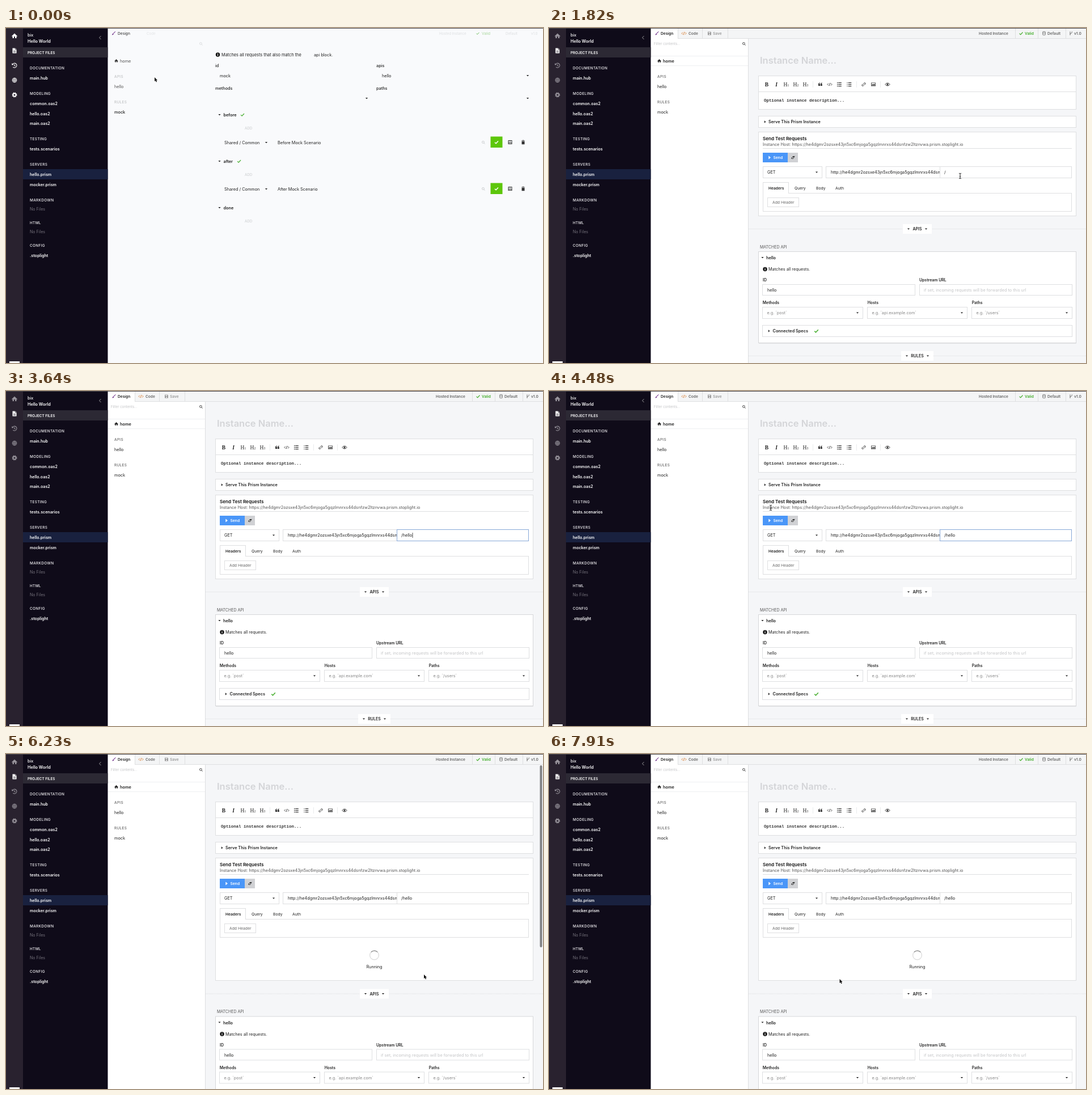
These frames come from a looping animation (947x591 px, 8000 ms). An HTML page with a canvas:

```html
<!DOCTYPE html>
<html lang="en">
<head>
<meta charset="utf-8">
<title>API console</title>
<style>
html, body { margin: 0; width: 100%; height: 100%; overflow: hidden; background: #f5f6f8; }
canvas { display: block; }
</style>
</head>
<body>
<canvas id="stage" width="947" height="591"></canvas>
<script>
const g = document.getElementById('stage').getContext('2d');
const LOOP = 8000, OPEN = 1260, FOCUS = 2100, TYPE = 2940, RUN = 5390;
const SANS = 'Inter, "Open Sans", sans-serif';
const INK = '#222', LINE = '#dedfe1', GREEN = '#43ad2b';
const HOST = 'he4dgmr2ozsxe43jn5xc6mjoga5gqzlmnrxs44dsnfzw2ltznvwa.prism.stoplight.io';

// y is the middle of the capitals
function text(s, x, y, { size = 7.3, w = 400, c = INK, ls = 0, font = SANS, align = 'left' } = {}) {
  g.font = `${w} ${size}px ${font}`;
  g.letterSpacing = ls + 'px';
  g.textAlign = align;
  g.fillStyle = c;
  g.fillText(s, x, y + size * 0.36);
}
const bold = (s, x, y, o) => text(s, x, y, { w: 600, ...o });
const caps = (s, x, y, c, w = 500) => text(s, x, y, { size: 6.4, w, ls: 0.35, c });

function fill(x, y, w, h, c) { g.fillStyle = c; g.fillRect(x, y, w, h); }

function box(x1, y1, x2, y2, bg = '#fff', line = LINE) {
  fill(x1, y1, x2 - x1, y2 - y1, bg);
  g.strokeStyle = line;
  g.lineWidth = 1;
  g.strokeRect(x1 + 0.5, y1 + 0.5, x2 - x1 - 1, y2 - y1 - 1);
}

function icon(d, x, y, c, stroke = 0, k = 1) {
  g.save();
  g.translate(x, y);
  g.scale(k, k);
  g.fillStyle = g.strokeStyle = c;
  g.lineWidth = stroke;
  const p = new Path2D(d);
  if (stroke) g.stroke(p); else g.fill(p, 'evenodd');
  g.restore();
}

const ring = r => `M${r} 0A${r} ${r} 0 1 1 ${-r} 0A${r} ${r} 0 1 1 ${r} 0Z`;
const HOME = 'M-5 .3L0-4.5L5 .3L4.3 1L3.5 .4V4H1V1H-1V4H-3.5V.4L-4.3 1Z';
const FILE = 'M-3.5-4.5H.8V-1.7H3.5V4.5H-3.5ZM1.5-4.5L3.5-2.4H1.5ZM-2 0V.8H2V0ZM-2 2V2.8H2V2Z';
const down = (x, y, c = INK) => icon('M-2.1-1H2.1L0 1.2Z', x, y, c);
const right = (x, y, c = INK, k = 1) => icon('M-1.2-2.2L1.4 0L-1.2 2.2Z', x, y, c, 0, k);
const check = (x, y, c = GREEN, k = 1, w = 1.15) => icon('M-3 .2L-.9 2.2L3-2', x, y, c, w, k);
const lens = (x, y, c) => icon(ring(1.9) + 'M1.4 1.4L3.2 3.2', x - 0.6, y - 0.6, c, 1);
const code = (x, y, c) => icon('M-2-2L-4 0L-2 2M2-2L4 0L2 2M.8-2.6L-.8 2.6', x, y, c, 0.9);
const brush = (x, y) => icon('M3.3-3.3L0 .2L-.8-.6L2.5-3.5ZM-1.2 0C.4.7 0 2.8-3.3 2.8C-2.2 1.8-2.6.4-1.2 0Z', x, y, '#6b2a86');

function info(x, y) {
  icon(ring(3.7), x, y, '#111');
  fill(x - 0.6, y - 0.6, 1.2, 2.8, '#fff');
  fill(x - 0.6, y - 2.3, 1.2, 1.1, '#fff');
}

function sidebar(open) {
  fill(0, 0, 30, 591, '#29222f');
  fill(30, 0, 149.5, 591, '#0f0b19');
  fill(30, 34, 149.5, 18, '#2c2934');
  fill(30, 249, 149.5, 18, '#19213f');
  const dim = open ? '#96929a' : '#fff';
  icon(HOME, 15, 14, dim);
  icon(FILE, 15, 40, '#fff');
  icon('M-3.4-1.8A3.9 3.9 0 1 1-2.7 2.8M-4.2-3.6V-1.2H-1.8M0-2V.3L1.7 1.4', 15, 66, dim, 1.1);
  icon(ring(3.9) + 'M-4 0H4M0-4V4M0-4C-2.5-2-2.5 2 0 4C2.5 2 2.5-2 0-4', 15, 92, dim, 0.9);
  g.setLineDash([1.6, 1.4]);
  icon(ring(3.8), 15, 118, dim, 1.4);
  g.setLineDash([]);
  icon(ring(2.5), 15, 118, dim, 1.8);
  fill(6, 588, 18, 3, '#fff');

  text('bix', 38, 12, { c: '#fff', w: 500 });
  bold('Hello World', 38, 23.5, { c: '#fff' });
  icon('M1.5-3L-1.5 0L1.5 3', 166, 17, '#aaa', 0.9);
  bold('PROJECT FILES', 38, 43.5, { c: '#fff', size: 6.4 });
  const heads = { DOCUMENTATION: 71, MODELING: 115.5, TESTING: 196, SERVERS: 241, MARKDOWN: 303.5, HTML: 343.5, CONFIG: 383.5 };
  for (const h in heads) caps(h, 42, heads[h], '#f4f3f6', 550);
  const files = { 'main.hub': 88, 'common.oas2': 133, 'hello.oas2': 151, 'main.oas2': 168.5, 'tests.scenarios': 213.5,
    'hello.prism': 258.5, 'mocker.prism': 276, '.stoplight': 401 };
  for (const f in files) bold(f, 42, files[f], { c: '#fff', size: 7.1 });
  for (const y of [319.5, 359.5]) text('No Files', 42, y, { c: '#75727c', size: 7.1 });
}

function rulePage(hover) {
  const faint = '#c9cbcd';
  fill(179, 0, 768, 591, '#f9fafc');
  brush(190, 9.5);
  text('Design', 197, 9.5, { size: 6.6, w: 500, c: '#444' });
  text('Code', 248, 9.5, { size: 6.2, c: '#e2e3e5' });
  text('Hosted Instance', 764, 9.5, { size: 6.2, c: '#dcdee0' });
  check(832, 9.5, '#62b74e', 0.8);
  text('Valid', 839, 9.5, { size: 6.6, c: '#a8d69c' });
  text('Default', 881, 9.5, { size: 6.2, c: '#dcdee0' });
  text('v1.0', 926, 9.5, { size: 6.2, c: '#dcdee0' });
  lens(344, 28, '#dcdee0');

  icon(HOME, 194.5, 58, hover ? '#4a90c8' : '#333', 0, 0.64);
  text('home', 201, 58, { c: hover ? '#c2cad1' : '#555' });
  caps('APIS', 191, 86, '#bfc1c3');
  text('hello', 191, 103, { c: '#555' });
  caps('RULES', 191, 131, '#bfc1c3');
  text('mock', 191, 148, { w: 500 });

  info(373.5, 47);
  text('Matches all requests that also match the', 380, 47, { size: 7.4 });
  text('api block.', 543, 47);
  text('id', 369, 66.5, { w: 500 });
  text('apis', 653, 66.5, { w: 500 });
  text('mock', 377, 84);
  text('hello', 663, 84);
  text('methods', 369, 106.5, { w: 500 });
  text('paths', 653, 106.5, { w: 500 });
  down(920, 84);
  down(636, 124);
  down(920, 124);

  for (const [name, y, tick] of [['before', 153, 417], ['after', 235, 411], ['done', 317, 0]]) {
    down(376.5, y);
    bold(name, 383.5, y);
    if (tick) check(tick, y);
    text('ADD', 421, y + 23.5, { size: 6.2, c: faint });
    if (!tick) continue;
    const r = y + 49;
    text('Shared / Common', 385, r);
    down(459, r);
    text(name[0].toUpperCase() + name.slice(1) + ' Mock Scenario', 479, r);
    lens(842, r, faint);
    fill(854.5, r - 10.5, 21, 19.5, '#5dc60b');
    check(865, r - 0.5, '#fff', 1, 1.5);
    icon('M-3-3.5H3.5V3.5H-3.5V-3ZM-2.4-2.6V.6H2.6V-2.6ZM-2.5 1.6V2.5H2.5V1.6ZM-1.5-1.8H1.7V-1.1H-1.5Z', 889, r - 0.5, '#333');
    icon('M-3-3H-1V-3.8H1V-3H3V-2.2H-3ZM-2.5-1.6H2.5V3.8H-2.5Z', 912, r - 0.5, '#333');
  }
}

function header() {
  fill(179, 0, 768, 18, '#f4f5f6');
  fill(179, 18, 768, 1, LINE);
  fill(179, 1, 48, 18, '#fff');
  for (const x of [227, 270, 315, 822, 862, 911]) fill(x, 1, 1, 17, LINE);
  const o = { size: 6.6, c: '#666' };
  brush(190.5, 9.5);
  bold('Design', 197, 9.5, { size: 6.6 });
  code(238, 9.5, '#d87a2c');
  bold('Code', 246, 9.5, o);
  icon('M-3-3H2L3-2V3H-3ZM-1.7-2.2V-.7H1.3V-2.2ZM-1 .7V2.2H1V.7Z', 283, 9.5, '#999');
  bold('Save', 289, 9.5, { ...o, c: '#999' });
  bold('Hosted Instance', 758, 9.5, o);
  check(832.5, 9.5);
  bold('Valid', 839, 9.5, { size: 6.6, c: GREEN });
  icon('M-2.5-2.4C-2.5-3.5 2.5-3.5 2.5-2.4V2.4C2.5 3.5-2.5 3.5-2.5 2.4ZM-2.5-2.4C-2.5-1.3 2.5-1.3 2.5-2.4M-2.5 0C-2.5 1.1 2.5 1.1 2.5 0', 873, 9.5, '#777', 0.8);
  bold('Default', 879, 9.5, o);
  icon('M-1.5-2V2M1.8-2C1.8 0-1.5 0-1.5 1.5M-1.5-3.2V-2M1.8-3.2V-2M-1.5 2V3.2', 920.5, 9.5, '#666', 1);
  bold('v1.0', 926, 9.5, o);
}

function contents() {
  fill(179, 19, 172, 572, '#fff');
  fill(351, 19, 1, 572, LINE);
  text('Filter contents...', 185, 27.5, { size: 6.1, c: '#c3c4c6' });
  lens(344, 28, '#444');
  fill(180, 49, 171, 1, '#eeeff1');
  fill(180, 66, 171, 1, '#eeeff1');
  icon(HOME, 194.5, 58, '#222', 0, 0.68);
  bold('home', 201, 58);
  caps('APIS', 191, 86, '#666');
  text('hello', 191, 103);
  caps('RULES', 191, 131, '#666');
  text('mock', 191, 148);
}

function toolbar() {
  const y = 99.5, serif = '"Liberation Serif", serif', c = '#333';
  text('B', 384, y, { size: 9.5, w: 700, font: serif, align: 'center' });
  text('I', 401, y, { size: 9.5, w: 'italic 700', font: serif, align: 'center' });
  [414, 431, 448].forEach((x, i) => {
    text('H', x - 0.5, y, { size: 9.5, font: serif });
    text(i + 1, x + 6.5, y + 2, { size: 5.5, font: serif });
  });
  for (const x of [475, 478.8]) icon('M0 0C0-2 1-3 3-3V-2.2C2-2 1.8-1.2 1.8-.4H3V2.6H0Z', x, y, c);
  code(495, y, c);
  for (const x of [512, 529.5]) for (const d of [-3, 0, 3]) {
    fill(x - 1.8, y + d - 0.6, 5.6, 1.2, c);
    fill(x - 4, y + d - 0.7, x > 520 ? 0.9 : 1.4, 1.4, c);
  }
  icon('M-.6.6L.8-.8M-.6-1.2L.8-2.6C2.2-3.6 3.8-2 2.8-.6L1.6.6M.6 1.2L-.8 2.6C-2.2 3.6-3.8 2-2.8.6L-1.6-.6', 555, y, c, 1);
  icon('M-4-3H4V3H-4ZM-3.2-2.2V2.2H3.2V-2.2ZM-2.8 1.8V.8L-1.3-.6L0 .6L1.4-1L2.8 .6V1.8Z', 572, y, c);
  icon('M-4 0C-2-3.2 2-3.2 4 0C2 3.2-2 3.2-4 0Z', 597, y, c, 1);
  icon(ring(1.5), 597, y, c);
  for (const x of [465, 542, 584]) fill(x, 94, 1, 11, '#eaebec');
}

function chip(s, y, half) {
  g.strokeStyle = '#dcdee0';
  g.lineWidth = 1;
  g.setLineDash([1, 1]);
  g.beginPath();
  g.moveTo(352, y);
  g.lineTo(947, y);
  g.stroke();
  g.setLineDash([]);
  fill(649.5 - half, y - 8.5, half * 2, 17, '#fff');
  bold(s, 649.5, y, { size: 7, align: 'center' });
  down(659.5 - half, y);
  down(639.5 + half, y);
}

function apiBox(dy) {
  g.save();
  g.translate(0, dy);
  chip('APIS', 354.5, 25.5);
  text('MATCHED API', 372, 386, { size: 7, c: '#555' });
  fill(370, 555, 560, 2, '#e4e5e7');
  box(369, 394, 930, 556, '#fff', '#d6d7d9');
  down(376.5, 405);
  bold('hello', 383, 405.5);
  info(381, 425.5);
  text('Matches all requests.', 387, 425.5);
  bold('ID', 377, 445, { size: 6.9 });
  bold('Upstream URL', 653, 445, { size: 6.9 });
  box(376, 452, 646, 472);
  box(653, 452, 923, 472);
  text('hello', 385, 462.5);
  text('if set, incoming requests will be forwarded to this url', 661, 462.5, { c: '#c4c5c7' });
  for (const [label, hint, x, end] of [['Methods', 'post', 376, 554], ['Hosts', 'api.example.com', 561, 738], ['Paths', '/users', 745, 923]]) {
    bold(label, x + 0.7, 485, { size: 6.9 });
    box(x, 492, end, 513);
    text('e.g. `' + hint + '`', x + 8.5, 502.5, { c: '#888' });
    down(end - 10, 502.5);
  }
  box(376, 524, 923, 545);
  right(388, 534.5);
  bold('Connected Specs', 394.5, 534.5);
  check(471.5, 534.5, GREEN, 1.1, 1.4);
  chip('RULES', 578.5, 28.5);
  g.restore();
}

function spinner(t) {
  const a = -Math.PI / 2 + (t - RUN) / 840 * Math.PI * 2;
  g.lineWidth = 1.3;
  g.strokeStyle = '#dcdcdc';
  g.beginPath();
  g.arc(649.5, 355, 7.9, 0, 7);
  g.stroke();
  g.strokeStyle = '#8a8a8a';
  g.beginPath();
  g.arc(649.5, 355, 7.9, a - 0.8, a + 0.8);
  g.stroke();
  text('Running', 649.5, 375.5, { align: 'center' });
}

// The caret restarts its blink on focus and on each key
function pathField(t) {
  const keys = [TYPE, 3220, 3360, 3500, 3640].filter(k => t >= k);
  const value = '/' + 'hello'.slice(0, keys.length);
  const focused = t >= FOCUS && t < RUN;
  const blur = Math.min(1, Math.max(0, (t - RUN) / 300));
  const grey = Math.round(190 + 32 * blur);
  box(689, 244, 922, 265, '#fff', focused ? '#88a9d8' : t < FOCUS ? LINE : `rgb(${grey},${grey},${grey})`);
  text(value, 697, 254.5);
  const since = t - (keys.length ? keys[keys.length - 1] : FOCUS);
  if (focused && since % 1000 < 500) fill(697.5 + g.measureText(value).width, 250, 0.8, 9, '#222');
}

function homePage(t) {
  const run = t >= RUN;
  fill(179, 0, 768, 591, '#f5f6f8');
  header();
  contents();
  bold('Instance Name...', 372, 57, { size: 16.5, c: '#d4d5d8' });
  box(369, 84, 930, 144);
  fill(370, 112, 559, 1, LINE);
  toolbar();
  text('Optional instance description...', 379, 127.5, { size: 7.42, w: 700, c: '#333', font: '"Liberation Mono", monospace' });
  box(369, 155, 930, 176);
  right(381, 165.5);
  bold('Serve This Prism Instance', 387, 165.5);

  box(369, 183, 930, run ? 400 : 332);
  bold('Send Test Requests', 377, 195, { size: 8.1, c: '#111' });
  text('Instance Host: https://' + HOST, 377, 205, { c: '#555' });
  fill(377, 212, 545, 1, LINE);
  const hover = t >= 4760 && t < 5600;
  fill(377, 220, 44, 17, hover ? '#62a6fb' : '#4a96f8');
  right(389, 228.5, '#fff', 1.4);
  bold('Send', 395.5, 228.5, { size: 6.7, c: '#fff' });
  fill(421, 220, 18, 17, '#d0d1d4');
  icon('M-3.4 1L0-2.6H3.2L.2 2.6H-2.6ZM-2.2 1L-1.7 1.7H-.1L1-.4H-.8Z', 430.5, 228.5, '#333');

  box(377, 244, 482, 265);
  text('GET', 385, 254.5);
  down(472, 254.5);
  box(488, 244, 690, 265);
  g.save();
  g.beginPath();
  g.rect(489, 245, 200, 19);
  g.clip();
  text('http://' + HOST, 497, 254.5);
  g.restore();
  pathField(t);

  box(377, 291, 922, 324);
  box(377, 272, 423, 292);
  fill(378, 291, 44, 1, '#fff');
  bold('Headers', 387, 282.5, { size: 6.7 });
  [['Query', 433], ['Body', 471], ['Auth', 505]].forEach(([s, x]) => text(s, x, 282.5, { size: 6.8 }));
  box(385, 299, 441, 316);
  text('Add Header', 394, 307.5, { size: 6.8, c: '#666' });

  if (run) spinner(t);
  apiBox(run ? 68.5 : 0);
  if (run) {
    g.globalAlpha = Math.min(1, Math.max(0, (6500 - t) / 250));
    g.fillStyle = '#818284';
    g.beginPath();
    g.roundRect(941.5, 20, 4, 321, 2);
    g.fill();
    g.globalAlpha = 1;
  }
}

const TRACK = [[0, 262, 87], [840, 269, 63], [1190, 269, 63], [1470, 547, 177], [1540, 547, 177], [1820, 725, 261],
  [3850, 725, 261], [4400, 391, 206], [4550, 391, 206], [4760, 404, 229], [5530, 404, 229], [6130, 737, 389],
  [7210, 737, 389], [7770, 512.5, 397]];

function position(t) {
  const i = TRACK.findIndex(k => k[0] > t);
  if (i < 0) return TRACK[TRACK.length - 1].slice(1);
  const [a, ax, ay] = TRACK[i - 1], [b, bx, by] = TRACK[i];
  const u = (t - a) / (b - a), e = u * u * (3 - 2 * u);
  return [ax + (bx - ax) * e, ay + (by - ay) * e];
}

function pointer(t) {
  if (t >= TYPE && t < 3850) return;
  const [x, y] = position(t);
  const within = (x1, y1, x2, y2) => t >= OPEN && x >= x1 && x <= x2 && y >= y1 && y <= y2;
  if (within(689, 244, 922, 265) || within(377, 200, 732, 211)) {
    icon('M-2-4.7Q0-4.7 0-3.5Q0-4.7 2-4.7M0-3.5V3.5M-2 4.7Q0 4.7 0 3.5Q0 4.7 2 4.7M-1 .8H1', x, y, '#111', 0.9);
  } else if (within(377, 220, 421, 237)) {
    const hand = 'M-.8.5Q0-.8.8.5V3.2L4 4Q4.8 4.4 4.4 6L3.6 8.7H-.8L-3.4 5.4Q-3.6 4.2-2.4 4.6L-.8 5.6Z';
    icon(hand, x, y, '#fff');
    icon(hand, x, y, '#111', 0.9);
  } else {
    const arrow = 'M0 0V7.3L1.7 5.8L2.9 8.4L4.2 7.8L3 5.3H5.2Z';
    icon(arrow, x, y, '#fff', 1.4);
    icon(arrow, x, y, '#111');
  }
}

function draw(now) {
  const t = now % LOOP, open = t >= OPEN;
  if (open) homePage(t); else rulePage(t >= 560);
  sidebar(open);
  fill(0, 0, 947, 1, '#4a484d');
  pointer(t);
  requestAnimationFrame(draw);
}
requestAnimationFrame(draw);
</script>
</body>
</html>
```
